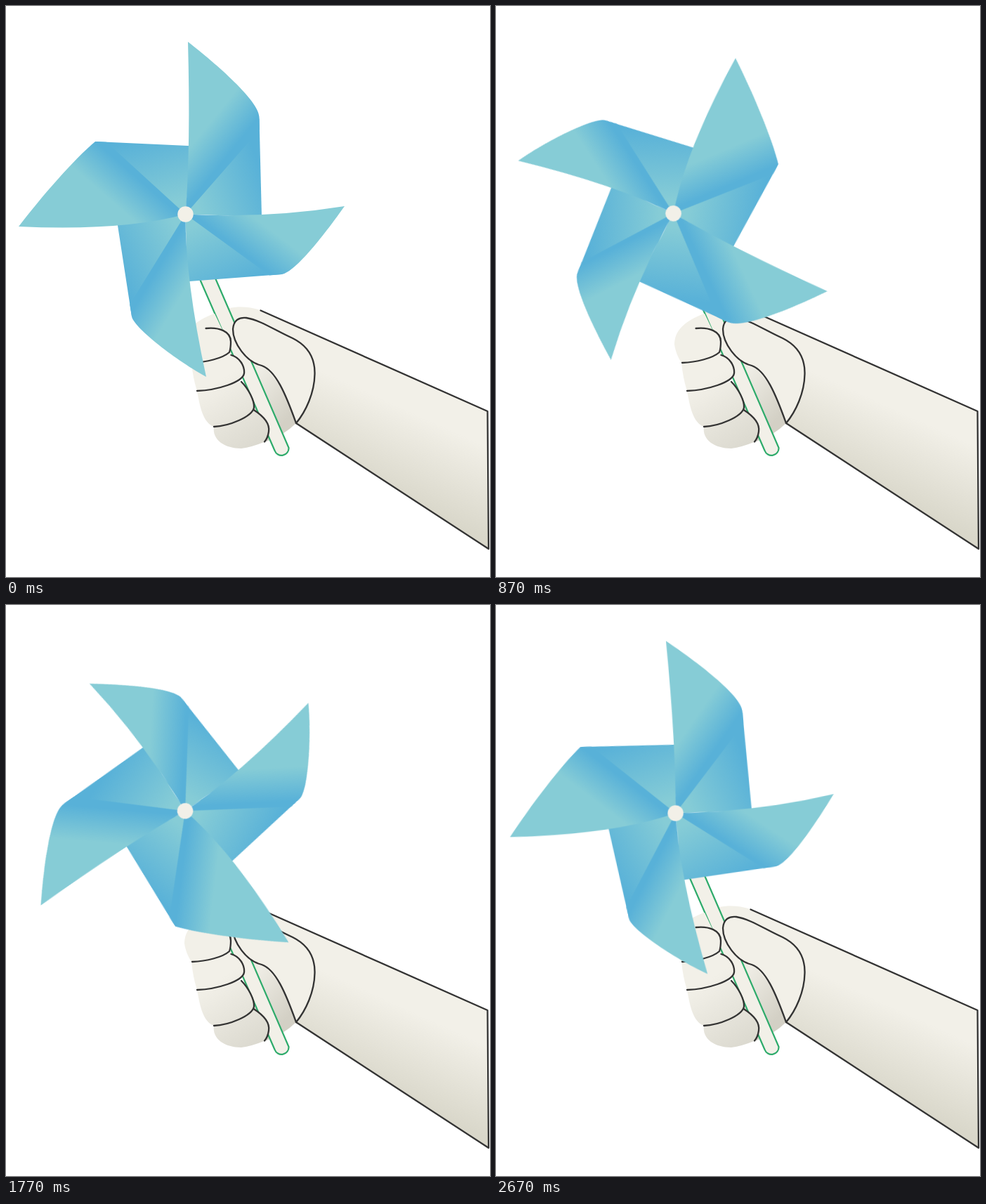
Write an HTML page that moves like this. It is 689 px wide and 813 px high and loops after 2.7 s.

```html
<!DOCTYPE html>
<html lang="en">
<head>
<meta charset="utf-8">
<title>Pinwheel</title>
<style>
  html, body { margin: 0; width: 100%; height: 100%; overflow: hidden; background: #fff; }
  svg { display: block; width: 689px; height: 813px; }
  .ink { fill: none; stroke: #333; stroke-width: 2.3; stroke-linecap: round; stroke-linejoin: round; }
  .skin { fill: #f2f0e8; }
  #wheel { transform-origin: 254.4px 295px; animation: spin 2.7s steps(90) infinite; }
  @keyframes spin { to { transform: rotate(360deg); } }
</style>
</head>
<body>
<svg viewBox="0 0 689 813">
  <defs>
    <linearGradient id="flap" gradientUnits="userSpaceOnUse" x1="-55" x2="-6" y1="0" y2="0">
      <stop offset="0" stop-color="#86ccd6"/><stop offset="1" stop-color="#58b1d8"/>
    </linearGradient>
    <linearGradient id="back" gradientUnits="userSpaceOnUse" x1="20" x2="122" y1="0" y2="0">
      <stop offset="0" stop-color="#86ccd6"/><stop offset="1" stop-color="#58b1d8"/>
    </linearGradient>
    <linearGradient id="flapA" href="#flap" gradientTransform="translate(255.5 296.5) rotate(39)"/>
    <linearGradient id="flapB" href="#flap" gradientTransform="translate(255.5 296.5) rotate(127)"/>
    <linearGradient id="flapC" href="#flap" gradientTransform="translate(255.5 296.5) rotate(211)"/>
    <linearGradient id="flapD" href="#flap" gradientTransform="translate(255.5 296.5) rotate(-49)"/>
    <linearGradient id="backA" href="#back" gradientTransform="translate(255.5 296.5) rotate(-20)"/>
    <linearGradient id="backB" href="#back" gradientTransform="translate(255.5 296.5) rotate(66)"/>
    <linearGradient id="backC" href="#back" gradientTransform="translate(255.5 296.5) rotate(154)"/>
    <linearGradient id="backD" href="#back" gradientTransform="translate(255.5 296.5) rotate(-105)"/>
    <linearGradient id="arm" gradientUnits="userSpaceOnUse" x1="560" y1="570" x2="510" y2="679">
      <stop offset="0" stop-color="#f2f0e8"/><stop offset="1" stop-color="#d9d7ca"/>
    </linearGradient>
    <linearGradient id="fingers" gradientUnits="userSpaceOnUse" x1="300" y1="535" x2="362" y2="630">
      <stop offset="0" stop-color="#f2f0e8"/><stop offset="1" stop-color="#dad8ce"/>
    </linearGradient>
    <linearGradient id="palm" gradientUnits="userSpaceOnUse" x1="352" y1="530" x2="408" y2="580">
      <stop offset="0" stop-color="#eeece4"/><stop offset="1" stop-color="#d3d0c5"/>
    </linearGradient>
  </defs>

  <!-- arm and palm -->
  <path fill="url(#arm)" d="M362 433L686 577L687 773L413 594L400 470Z"/>
  <path class="skin" d="M362 433C345 427 328 428 318 430C302 434 288 441 275 450L330 520L420 560L440 470Z"/>
  <path fill="url(#palm)" d="M330 500L364 510L395 545L413 594Q395 612 368 621L345 560Z"/>

  <!-- stick -->
  <path fill="#f2f0e8" stroke="#2eab6b" stroke-width="2.2"
    d="M262 357L382.5 633A10.3 10.3 0 0 0 402.5 629L283 353"/>

  <!-- fingers -->
  <path fill="url(#fingers)" d="M352 575C365 583 376 594 374 606C373 613 370 618 367 621Q350 628 335 630C312 630 293 618 296 599Z"/>
  <path fill="url(#fingers)" d="M334 535C345 545 354 562 353 572C350 585 318 598 296 599C280 593 276 570 272 548Z"/>
  <path fill="url(#fingers)" d="M320 497C332 500 340 512 339 523C337 536 300 547 272 548Q266 530 264 507Z"/>
  <path class="skin" d="M297 438C266 449 254 464 254 482Q256 496 264 508C285 507 308 502 318 493C319 490 320 486 320 478C320 470 316 464 308 461Z"/>
  <path class="ink" d="M284.500 459C303 457 320 463 320 478C320 486 319 490 318 493C308 502 285 507 265 508"/>
  <path class="ink" d="M320.500 497C332 500 340 512 339 523C337 536 300 547 272 548"/>
  <path class="ink" d="M335 535C345 545 354 562 353 572C350 585 318 598 296 599"/>
  <path class="ink" d="M352.500 575C365 583 376 594 374 606C373 613 371 617 368 620.500"/>

  <!-- thumb and sleeve line -->
  <path class="ink" style="fill:#f2f0e8" d="M413 594C398 552 384 519 364 512C342 507 323 480 323 460C324 447 332 443 342 444C362 447 385 463 408 473C430 484 440 502 439.500 524C439 551 427 577 413 594Z"/>
  <path class="ink" d="M362.500 433.500L685.500 577L687 773L413 594"/>

  <g id="wheel">
    <path fill="url(#backA)" d="M255.500 296.500L360.500 160L364 300Z"/>
    <path fill="url(#backB)" d="M255.500 296.500L392 382L258 392.300Z"/>
    <path fill="url(#backC)" d="M255.500 296.500L179 442L158.300 308Z"/>
    <path fill="url(#backD)" d="M255.500 296.500L128 193L264 199.200Z"/>
    <path fill="url(#flapA)" d="M259 51C300 83 360 135 360.500 158L361 176L255.500 296.500Q263 200 259 51Z"/>
    <path fill="url(#flapB)" d="M482 285C455 323 413 378 393 382L375 383.500L255.500 296.500Q370 303 482 285Z"/>
    <path fill="url(#flapC)" d="M285 528C235 500 181 456 179 442L176.200 425L255.500 296.500Q255 390 285 528Z"/>
    <path fill="url(#flapD)" d="M18 314C50 272 97 218 127 193L143 193.700L255.500 296.500Q165 321 18 314Z"/>
    <circle class="skin" cx="255.500" cy="296.500" r="11.200"/>
  </g>
</svg>
</body>
</html>
```
